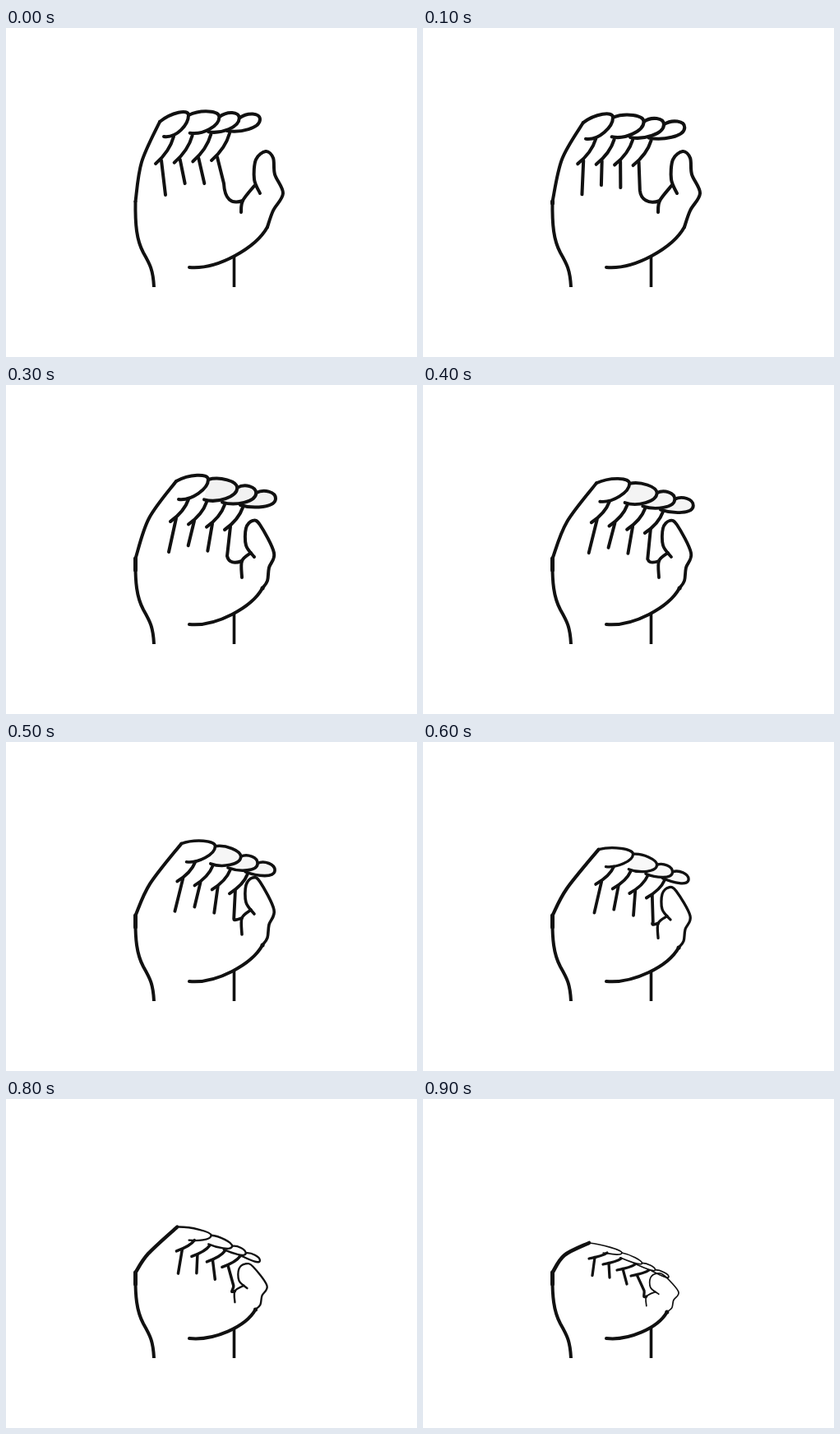
Recreate the animation shown at these times as an HTML page. Size 500 by 400 pixels, loop 1 s.

```html
<!DOCTYPE html>
<html lang="en">
<head>
<meta charset="utf-8">
<title>Closing hand</title>
<style>
  html, body { margin: 0; width: 100%; height: 100%; overflow: hidden; background: #fff; }
  svg { display: block; width: 500px; height: 400px; }
  path { fill: none; stroke: #111; stroke-linecap: round; stroke-linejoin: round; }
  .wrist { stroke-linecap: butt; }
  .pose { visibility: hidden; animation: show 1s step-end infinite; }
  @keyframes show { 0% { visibility: visible; } 10%, 100% { visibility: hidden; } }
</style>
</head>
<body>
<svg id="stage" viewBox="0 0 500 400">
  <path class="wrist" d="M157.5 210C157 240 159 258 167 273C175 287 179 294 180 315" stroke-width="4"/>
  <path class="wrist" d="M277.5 278V315" stroke-width="3.6"/>
</svg>
<script>
const stage = document.getElementById('stage');
const joint = [157.5, 211];

// Key poses. Rows of the hand are given by their first and last finger:
// tips, pads (where creases begin) and lines (where finger lines end).
const keys = [
  { step: 0, mid: [165, 163], shoulder: [187, 114], tips: [222, 106, 309, 111],
    pads: [204, 132, 272, 128], lines: [194, 189, 265, 189], drop: [33], size: [1] },
  { step: 3, mid: [174, 162], shoulder: [207, 117], tips: [246, 115, 328, 138],
    pads: [222, 139, 288, 149], lines: [198, 189, 269, 208], drop: [27], size: [1] },
  { step: 7, mid: [174, 184], shoulder: [212, 141], tips: [254, 149, 317, 180],
    pads: [232, 160, 291, 178], lines: [210, 200, 280, 222], drop: [18], size: [.7] },
  { step: 9, mid: [172, 190], shoulder: [202, 175], tips: [242, 187, 299, 216],
    pads: [224, 187, 275, 208], lines: [206, 209, 269, 233], drop: [7], size: [.4] }
];

const openThumb = {
  outline: [[318,242], [325,222], [337,201], [327,178], [325,158], [316,150], [304,160], [302,184], [309,201]],
  crease: [[302,192], [288,210], [286,224]]
};
const bentThumb = {
  outline: [[312,247], [318,238], [320,222], [326,204], [309,170], [300,165], [292,174], [292,195], [302,209]],
  crease: [[298,204], [287,214], [287,234]]
};

const lerp = (a, b, t) => a + (b - a) * t;
const along = ([x1, y1, x2, y2], t) => [lerp(x1, x2, t), lerp(y1, y2, t)];
const spread = i => [0, .43, .71, 1][i];

// Cubic through the four key poses
function poseAt(step) {
  const weights = keys.map(a => keys.reduce((w, b) =>
    a === b ? w : w * (step - b.step) / (a.step - b.step), 1));
  const blend = name => keys[0][name].map((_, i) =>
    keys.reduce((sum, key, j) => sum + key[name][i] * weights[j], 0));
  return Object.fromEntries(Object.keys(keys[0]).filter(n => n !== 'step').map(n => [n, blend(n)]));
}

// The thumb bends once, then is pressed down
function thumbAt(step) {
  const { outline, crease } = step < 3 ? openThumb : bentThumb;
  const press = Math.max(0, step - 5);
  const move = ([x, y]) => [x - .95 * press ** 2, 247 + 3 * press + (y - 247) * (1 - .107 * press)];
  return { outline: outline.map(move), crease: crease.map(move) };
}

// Smooth curve through points
function curve(points) {
  const at = i => points[Math.max(0, Math.min(points.length - 1, i))];
  let d = 'M' + at(0);
  for (let i = 0; i < points.length - 1; i++) {
    const [a, b, c, e] = [at(i - 1), at(i), at(i + 1), at(i + 2)];
    const out = b.map((v, j) => v + (c[j] - a[j]) / 6);
    const into = c.map((v, j) => v - (e[j] - b[j]) / 6);
    d += `C${out} ${into} ${c}`;
  }
  return d;
}

function draw(step) {
  const pose = poseAt(step);
  const thumb = thumbAt(step);
  const k = pose.size[0], drop = pose.drop[0];
  const padWidth = .2 + 3.8 * k, creaseWidth = 2.8 + 1.2 * k;
  const gray = step < 3 ? 255 : 236 + 2 * step;
  const [x1, y1, x2, y2] = pose.tips;
  const slope = (y2 - y1) / (x2 - x1);

  const group = document.createElementNS(stage.namespaceURI, 'g');
  group.setAttribute('class', 'pose');
  group.style.animationDelay = `${step * 100 - 1000}ms`;
  const stroke = (d, width, fill = 'none') => {
    const path = document.createElementNS(stage.namespaceURI, 'path');
    path.setAttribute('d', d);
    path.style.strokeWidth = width;
    path.style.fill = fill;
    group.append(path);
  };

  for (let i = 3; i >= 0; i--) {
    const [tx, ty] = along(pose.tips, spread(i));
    const [px, py] = i ? along(pose.tips, spread(i - 1)) : pose.shoulder;
    const [cx, cy] = along(pose.pads, i / 3);
    const [ex, ey] = along(pose.lines, i / 3);
    const [bx, by] = [cx - 22, cy + drop];

    // Fingertip: over the top, round the tip, back under the pad
    const [ux, uy] = i ? [cx - 3 * k, cy - 3 * k] : [cx - 12 * k, cy];
    const sag = 2 + (i ? 10 * slope : 0);
    stroke(`M${px} ${py}C${lerp(px, tx, .4)} ${lerp(py, ty, .4) - 8 * k} ${tx} ${ty - 8 * k} ${tx} ${ty}` +
      `C${tx} ${ty + 11 * k} ${ux + 16 * k} ${uy + sag * k} ${ux} ${uy}`,
      padWidth, i ? `rgb(${gray},${gray},${gray})` : '#fff');

    stroke(`M${cx} ${cy}Q${bx + 17} ${cy + drop * .55} ${bx} ${by}`, creaseWidth);

    let line = `M${bx + 7} ${by - 4 * k}L${ex} ${i ? ey : ey + 14 * k}`;
    if (i === 3) {
      const [jx, jy] = thumb.crease[1];
      line += `C${ex + 1} ${Math.max(ey, jy - 2)} ${jx - 14 * k} ${jy + 5 * k} ${jx} ${jy}`;
    }
    stroke(line, creaseWidth);
  }
  stroke(curve([joint, pose.mid, pose.shoulder]), 5 - k);

  // Heel of the thumb
  const [x, y] = thumb.outline[0];
  const m = (x - 223) / 95;
  stroke(`M223 291C${223 + 35 * m} 294 ${x - 14 * m} ${y + 25 * m} ${x} ${y}`, 4);
  stroke(curve(thumb.outline), padWidth);
  stroke(curve(thumb.crease), padWidth);

  // Thicker ink where the hand hinges
  if (step) stroke(`M${joint}v${step < 3 ? 2 : 14}`, 5);
  if (step > 2) stroke(`M${x} ${y}h.1`, 5);
  stage.append(group);
}

for (let step = 0; step < 10; step++) draw(step);
</script>
</body>
</html>
```
